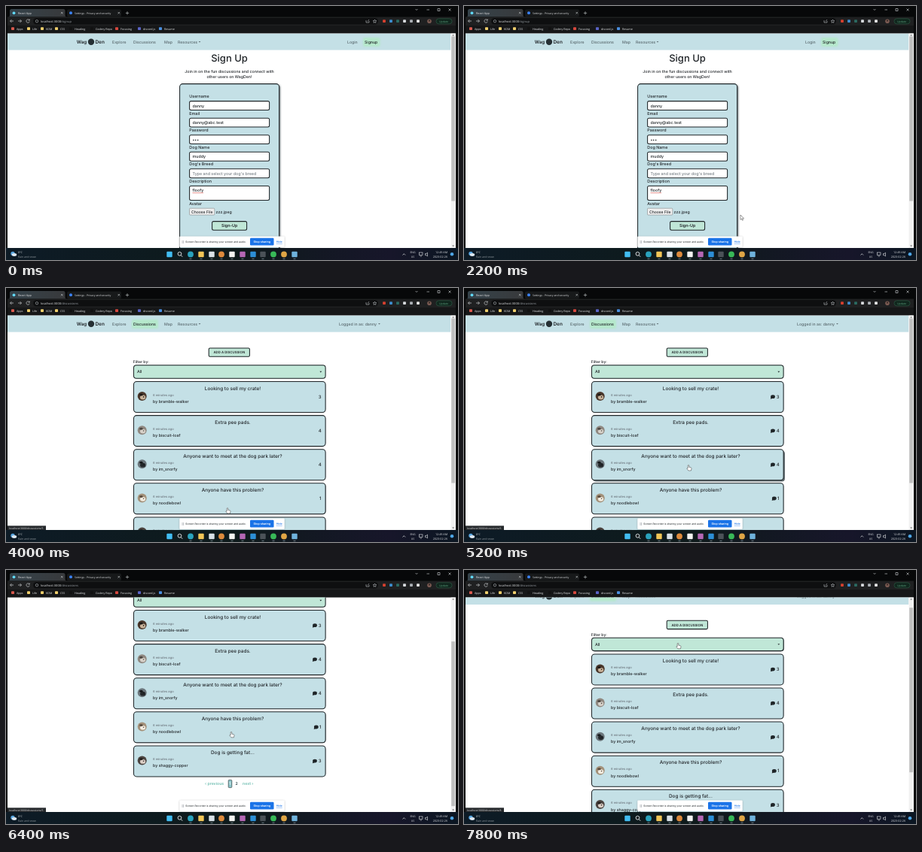
An HTML page that plays this animation: 600 by 338 pixels, repeating every 8000 ms.

```html
<!DOCTYPE html>
<html lang="en">
<head>
<meta charset="utf-8">
<title>Sign up and browse</title>
<style>
  html, body { margin: 0; width: 100%; height: 100%; overflow: hidden; background: #08090a; }
  svg { display: block; width: 100vw; height: 100vh; }
  text { font-family: Inter, sans-serif; font-weight: 500; fill: #212529; text-rendering: geometricPrecision; white-space: pre; }
  .ui text { font-family: "Open Sans", sans-serif; font-weight: 400; fill: #e4e6e8; }
  .ui text.dim { fill: #9aa0a6; }
  .glow { filter: blur(.8px); }
</style>
</head>
<body>
<svg id="stage" viewBox="0 0 600 338"></svg>
<script>
const LOOP = 8000, STEP = 200;
const SKY = '#c4e0e6', MINT = '#c0e7d7', INK = '#1f2528', GREY = '#59686d', SHADOW = '#5b666a';
const NAV_TIME = 4000, ICONS_TIME = 4200, HOVER_TIME = 2800;
const CARD_TOP = 124.5, CARD_GAP = 45.1, CARD_H = 41;

const rect = (x, y, w, h, fill, more = '') =>
  `<rect x="${x}" y="${y}" width="${w}" height="${h}" fill="${fill}" ${more}/>`;
const disc = (x, y, r, fill, more = '') => `<circle cx="${x}" cy="${y}" r="${r}" fill="${fill}" ${more}/>`;
const oval = (x, y, rx, ry, fill) => `<ellipse cx="${x}" cy="${y}" rx="${rx}" ry="${ry}" fill="${fill}"/>`;
const line = (d, stroke, width = .7) =>
  `<path d="${d}" fill="none" stroke="${stroke}" stroke-width="${width}"/>`;
const text = (x, y, s, size = 5.25, more = '') => `<text x="${x}" y="${y}" font-size="${size}" ${more}>${s}</text>`;
const group = (id, body, more = '') => `<g id="${id}" ${more}>${body}</g>`;
const box = (x, y, w, h, fill, r = 2, more = '') =>
  rect(x, y, w, h, fill, `rx="${r}" stroke="${INK}" stroke-width="1.05" ${more}`);
const caret = (x, y, c) => `<path d="M${x - 1.4} ${y}h2.8l-1.4 1.6z" fill="${c}"/>`;
const tint = c => `style="fill:${c}"`;
const MID = 'text-anchor="middle"', END = 'text-anchor="end"', BOLD = 'style="font-weight:600"';

function browserChrome() {
  const bookmarks = [
    [9, 'Apps', '#d95a4e'], [30, 'Life', '#f0cf6c'], [48, 'KDM', '#f0cf6c'], [67, 'CSS', '#f0cf6c'],
    [86, 'Heading', '#111'], [114, 'Codery Repo', '#111'], [147, 'Focusing', '#d8483e'],
    [177, 'discord.js', '#5b64c8'], [205, 'Resume', '#4a90e2']
  ];
  const extensions = [[502, '#d9402f'], [511, '#3d8fd1'], [520, '#2b6b62'], [529, '#d9dcdf'], [538, '#aeb3b8'], [547, '#e6e6e6']];
  return rect(0, 0, 600, 36.5, '#070809')
    + rect(81, 4.5, 72, 10, '#17191a', 'rx="2"')
    + '<path d="M3 14.5q2 0 2-2V6.5q0-2.5 2.5-2.5H76q2.5 0 2.5 2.5v6q0 2 2 2z" fill="url(#tab)"/>'
    + rect(2, 14.5, 595, 11.5, '#1f2021') + rect(2, 26, 595, 10.5, '#161718')
    + rect(36, 16, 458, 8.5, '#0e0f10', 'rx="4.2"')
    + disc(10.5, 9.3, 1.9, '#61dafb') + text(16, 10.7, 'React App', 3.8)
    + disc(86, 9.3, 2, '#3b82f6') + text(91, 10.7, 'Settings - Privacy and security', 3.5)
    + line('M73 8l2.5 2.500m0-2.500l-2.5 2.5M148.5 8l2.5 2.500m0-2.500l-2.5 2.5M161 7.2v4.400m-2.200-2.200h4.4', '#cfd3d6', .6)
    + line('M543.5 4l1.500 1.500 1.500-1.500M558.5 5h3.5M573 3.5h3v3h-3zM587.5 3.5l3 3m0-3l-3 3', '#d7dadd', .6)
    + line('M10 20H5.500m2-2l-2 2 2 2M16 20h4.500m-2-2l2 2-2 2', '#c9cccf')
    + line('M31 18.8a2.200 2.200 0 1 0 .3 1.8M31.3 17.5v1.600h-1.6', '#c9cccf')
    + disc(41, 20.2, 1.7, 'none', 'stroke="#b8bcc0" stroke-width=".6"')
    + `<text x="46" y="21.7" font-size="4">localhost:3000<tspan id="path" ${tint('#9aa0a6')}></tspan></text>`
    + line('M478 19v3h4v-2M480 20.5l2-2.5M489.5 18l.7 1.5 1.6.2-1.2 1.1.3 1.6-1.4-.8-1.4.8.3-1.6-1.2-1.1 1.6-.2z', '#c3c7ca', .6)
    + extensions.map(([x, c]) => rect(x - 1.9, 18.2, 3.8, 3.8, c, 'rx=".7"')).join('')
    + disc(562, 20.2, 2.8, '#7b5a52') + disc(562, 19.5, 1.1, '#312724')
    + rect(571, 16.8, 21, 7, '#10261d', 'rx="3.5" stroke="#2f6148" stroke-width=".6"')
    + text(581, 21.5, 'Update', 3.5, `${MID} ${tint('#5fa582')}`)
    + bookmarks.map(([x, s, c]) => rect(x - 2, 28.3, 4, 3.8, c, 'rx=".8"') + text(x + 5, 31.8, s, 3.7)).join('');
}

function taskbar() {
  const apps = [[217, '#42bdf2'], [245, '#2aa3bd', 1], [259, '#f2c657'], [273, '#d9e1e7'], [286, '#dd8a3c', 1],
    [300, '#f3f3f1'], [314, '#b467b4'], [328, '#2c8fd6'], [341, '#4b5258'], [355, '#38b958', 1], [369, '#dfa545', 1], [383, '#6fb2dc']];
  return rect(0, 322, 600, 16, 'url(#bar)')
    + disc(9, 329.5, 2.7, '#5aa7e0') + oval(11, 331, 3.2, 1.9, '#dfe9f2')
    + text(16, 329.2, '0°C', 3.5) + text(16, 334.5, 'Rain and snow', 3.5, 'class="dim"')
    + disc(230.5, 329.8, 2.4, 'none', 'stroke="#eceff1" stroke-width=".9"') + line('M232.2 331.6l2 2.2', '#eceff1', .9)
    + apps.map(([x, c, round]) => (round ? disc(x, 330.5, 3.9, c) : rect(x - 3.7, 326.8, 7.4, 7.4, c, 'rx="1"'))
      + (x > 240 ? rect(x - 1.5, 336.3, 3, .7, '#8fa0aa') : '')).join('')
    + line('M526.5 331.5l1.8-1.8 1.8 1.8', '#e5e8ea')
    + text(540, 329.4, 'ENG', 3.5, MID) + text(540, 334.6, 'US', 3.5, MID)
    + rect(548.5, 328, 4.5, 3.4, 'none', 'stroke="#e5e8ea" stroke-width=".6"')
    + line('M549.5 333h2.5M556.5 329.500h1.500l1.500-1.300v4.800l-1.500-1.300h-1.500z', '#e5e8ea', .6)
    + text(586, 329.4, '12:49 AM', 3.7, END) + text(586, 334.6, '2023-02-26', 3.7, END)
    + disc(592, 330.3, 2.3, '#4ea6e6');
}

function shareBar() {
  return rect(230, 306.8, 140, 14.6, '#333', 'rx="1.5" opacity=".25" class="glow"')
    + rect(230.3, 306.6, 139.4, 14.4, '#fff', 'rx="1.2"')
    + line('M234 312v4M235.5 312v4', '#9aa0a6', .6)
    + text(238.3, 315.2, 'Screen Recorder is sharing your screen and audio.', 3.35, tint('#3c4043'))
    + rect(324, 308.8, 31.5, 9.7, '#1a73e8', 'rx="1.2"')
    + text(339.8, 315, 'Stop sharing', 3.7, `${MID} style="fill:#fff;font-weight:600"`)
    + text(362.7, 315, 'Hide', 3.7, `${MID} text-decoration="underline" ${tint('#1a73e8')}`);
}

function navbar() {
  const highlight = (x, w) => rect(x, 42, w, 12, '#b5e8cb', 'rx="2" class="glow"');
  const link = (x, s, c = GREY) => text(x, 49.5, s, 5.2, tint(c));
  return rect(2, 36.5, 588.5, 22.1, SKY)
    + text(93.7, 49.8, 'Wag', 6.2, BOLD) + disc(113, 47.8, 4.2, '#263034') + text(118.5, 49.8, 'Den', 6.4, BOLD)
    + link(141, 'Explore') + link(210, 'Map') + link(228, 'Resources') + caret(257, 47, GREY)
    + group('guest', highlight(474, 22.5) + link(169, 'Discussions') + link(453, 'Login') + link(476, 'Signup', INK))
    + group('member', highlight(167, 35) + link(169, 'Discussions', INK) + link(442, 'Logged in as: danny') + caret(495.5, 47, GREY));
}

function signupPage() {
  const fields = [['Username', 'danny'], ['Email', 'danny@abc.test'], ['Password', '•••'],
    ['Dog Name', 'muddy'], ["Dog's Breed", "Type and select your dog's breed", '#747d83']];
  const label = (y, s) => text(243.3, y, s, 5.4);
  return text(296.5, 74, 'Sign Up', 13, MID)
    + text(296.5, 88.8, 'Join in on the fun discussions and connect with', 5.23, MID)
    + text(296.5, 96.4, 'other users on WagDen!', 5.23, MID)
    + rect(232, 104.8, 132, 240, SHADOW, 'rx="4" class="glow"')
    + box(230.6, 103.6, 132, 240, SKY, 4)
    + fields.map(([name, value, color = INK], i) => {
      const y = 126.6 + 22.55 * i;
      return label(y - 4.6, name) + box(243.6, y, 106, 11.9, '#fff') + text(247.5, y + 8, value, 5.3, tint(color));
    }).join('')
    + label(234.6, 'Description') + box(243.6, 239.5, 106, 19, '#fff')
    + text(247.5, 247.2, 'floofy', 5.3) + line('M247.5 248.7h14.5', '#d8473f', .6)
    + label(264.6, 'Avatar')
    + rect(243.5, 269.2, 33.3, 8.9, '#efefef', 'rx="1" stroke="#777" stroke-width=".5"')
    + text(260.2, 275.5, 'Choose File', 5.1, MID) + text(278.6, 275.5, 'zzz.jpeg', 5.2)
    + box(273.6, 286.6, 46, 11.7, MINT, 2, 'id="submit"')
    + text(296.6, 294.4, 'Sign-Up', 5.4, `${MID} id="submitText" ${BOLD}`);
}

function discussionsPage() {
  const posts = [
    ['Looking to sell my crate!', 'bramble-walker', 3, ['#4a382c', '#c9b39a', '#1d1815']],
    ['Extra pee pads.', 'biscuit-loaf', 4, ['#8f8881', '#d8d2ca', '#4d4742']],
    ['Anyone want to meet at the dog park later?', 'im_snorfy', 4, ['#6c777d', '#23272a', '#15181a']],
    ['Anyone have this problem?', 'noodlebowl', 1, ['#a3917a', '#f3ede2', '#5c4d3e']],
    ['Dog is getting fat...', 'shaggy-copper', 3, ['#4b4440', '#dccfc6', '#241f1d']]
  ];
  const pager = (x, s, c = '#72bfb3') => text(x, 357.2, s, 5.2, `style="fill:${c};font-weight:600"`);
  const photo = ([base, face, spot], y) => disc(180.7, y, 6, base)
    + oval(181.6, y + 1.4, 3.6, 2.9, face) + oval(179.4, y - 2, 2.4, 1.5, spot) + disc(182.6, y + .8, .8, spot);
  const card = ([title, author, count, tones], i) => {
    const y = CARD_TOP + CARD_GAP * i, bubbleX = count === 1 ? 411.8 : 410;
    return rect(169.5, y, 254.6, CARD_H, SHADOW, `rx="4" id="shadow${i}"`)
      + box(169.5, y, 254.6, CARD_H, SKY, 4)
      + text(301, y + 11, title, 6.4, MID) + photo(tones, y + 19.6)
      + text(195, y + 19.1, '6 minutes ago', 4.1, tint('#6c757d'))
      + text(195, y + 28.4, `by ${author}`, 5.3)
      + `<g class="bubble">${oval(bubbleX, y + 20.2, 2.9, 2.4, INK)}`
      + `<path d="M${bubbleX - 2.6} ${y + 20.5}l-.5 2.8 2.8-1z" fill="${INK}"/></g>`
      + text(418.6, y + 22.3, count, 6, END);
  };
  return box(269.2, 79.9, 54.2, 11.3, MINT, 1.5)
    + text(296.3, 87.3, 'ADD A DISCUSSION', 4.35, `${MID} ${BOLD}`)
    + text(168.7, 100.3, 'Filter by:', 5.1)
    + rect(169.5, 102.8, 254.6, 17.4, SHADOW, 'rx="3.5" id="selectShadow"')
    + box(169.5, 102.8, 254.6, 17.4, MINT, 3.5)
    + text(174, 113.4, 'All', 5.3) + caret(417.8, 110.8, INK)
    + posts.map(card).join('')
    + pager(264, '‹ previous') + rect(295.2, 350.4, 4.6, 10.2, '#8cc6cb', `rx="1" stroke="${INK}" stroke-width=".6"`)
    + pager(296.1, '1', '#f4fbfb') + pager(304.5, '2', '#30474c') + pager(314, 'next ›');
}

const stage = document.getElementById('stage');
stage.innerHTML = `<defs>
    <linearGradient id="tab"><stop stop-color="#35434b"/><stop offset="1" stop-color="#38393b"/></linearGradient>
    <linearGradient id="bar"><stop stop-color="#0d1b26"/><stop offset=".5" stop-color="#0e1a1b"/><stop offset=".85" stop-color="#17162a"/><stop offset="1" stop-color="#0b1622"/></linearGradient>
    <clipPath id="view">${rect(2, 36.5, 588.5, 285.5, '#000')}</clipPath>
  </defs>`
  + rect(0, 0, 600, 338, '#08090a')
  + group('browser', browserChrome(), 'class="ui"')
  + rect(2, 36.5, 595, 285.5, '#fff')
  + `<g clip-path="url(#view)">${group('page', navbar() + group('signup', signupPage()) + group('discussions', discussionsPage()))}</g>`
  + rect(590.5, 36.5, 6.2, 285.5, '#f1f1f1')
  + '<path d="M592.2 39.6l1.4-1.7 1.4 1.7zM592.2 318.5l1.4 1.7 1.4-1.7z" fill="#666"/>'
  + rect(591.2, 40.5, 4.8, 219, '#bfbfbf', 'id="thumb"')
  + group('share', shareBar())
  + group('status', rect(2, 316.4, 51, 6.2, '#25282b') + '<text id="statusText" x="4" y="320.8" font-size="3.4"></text>', 'class="ui"')
  + group('taskbar', taskbar(), 'class="ui"')
  + group('arrow', '<path d="M-2-3.5v6.4l1.5-1.3 1 2.2 1-.5-1-2.1h2z" fill="#fff" stroke="#333" stroke-width=".5"/>')
  + group('hand', '<path d="M-1.8-3.2q.9-1.1 1.6 0v2.4l2.5.6q.8.3.7 1.3l-.6 2.7h-3.5l-2-2.6q-.2-1.1 1.3-.4z" fill="#fff" stroke="#333" stroke-width=".5"/>');

const el = id => document.getElementById(id);
const show = (node, on) => node.setAttribute('display', on ? 'inline' : 'none');
const move = (id, x, y) => el(id).setAttribute('transform', `translate(${x} ${y})`);
const bubbles = [...document.querySelectorAll('.bubble')];

const cursorKeys = [[1000, 596, 211], [1200, 579, 217], [1600, 540, 238], [2400, 312, 296], [3000, 295, 297], [4400, 295, 296],
  [5400, 300, 225], [6000, 300, 225], [6400, 300, 219], [7200, 300, 205], [7800, 285, 101]];
const scrollKeys = [[5800, 0], [6000, 9.7], [6200, 32], [6400, 71], [6600, 71], [6800, 48], [7000, 22], [7200, 12.6]];

function sample(keys, t) {
  const next = keys.findIndex(k => k[0] > t);
  if (next === 0) return keys[0].slice(1);
  if (next < 0) return keys[keys.length - 1].slice(1);
  const a = keys[next - 1], b = keys[next], p = (t - a[0]) / (b[0] - a[0]);
  return a.slice(1).map((v, i) => v + (b[i + 1] - v) * p);
}

function hoveredCard(t) {
  if (t < NAV_TIME) return -1;
  const y = sample(cursorKeys, t)[1] + sample(scrollKeys, t)[0] - CARD_TOP;
  const i = Math.floor(y / CARD_GAP);
  return i >= 0 && i < 5 && y - i * CARD_GAP <= CARD_H ? i : -1;
}

// The link preview lingers after the pointer has left a card.
function lastCard(t) {
  while (t > NAV_TIME && hoveredCard(t) < 0) t -= STEP;
  return hoveredCard(t);
}

function render(t) {
  const member = t >= NAV_TIME, hand = t >= HOVER_TIME, pressed = hand && !member;
  const [x, y] = sample(cursorKeys, t), [scroll] = sample(scrollKeys, t);
  for (const id of ['member', 'discussions', 'status']) show(el(id), member);
  for (const id of ['guest', 'signup']) show(el(id), !member);
  el('path').textContent = member ? '/discussions' : '/signup';
  move('page', 0, -scroll);
  move('thumb', 0, scroll * .77);
  el('submit').setAttribute('fill', pressed ? '#c0e4dc' : MINT);
  show(el('submitText'), !pressed);
  bubbles.forEach(b => show(b, t >= ICONS_TIME));

  // A card lifts fully once the pointer has rested on it for a step.
  const card = hoveredCard(t), settled = card === hoveredCard(t - STEP);
  for (let i = 0; i < 5; i++) {
    const lift = i !== card ? 0 : settled ? 1.8 : .4;
    move('shadow' + i, lift, lift);
  }
  const onSelect = member && Math.abs(y + scroll - 111.5) < 9 ? .7 : 0;
  move('selectShadow', onSelect, onSelect);
  el('statusText').textContent = 'localhost:3000/discussions/' + (8 - lastCard(t));

  show(el('arrow'), t >= 1000 && !hand);
  show(el('hand'), hand);
  move('arrow', x, y);
  move('hand', x, y);
}

const start = performance.now();
function tick() {
  const t = (performance.now() - start) % LOOP;
  render(Math.floor(t / STEP) * STEP);
  requestAnimationFrame(tick);
}
tick();
</script>
</body>
</html>
```
